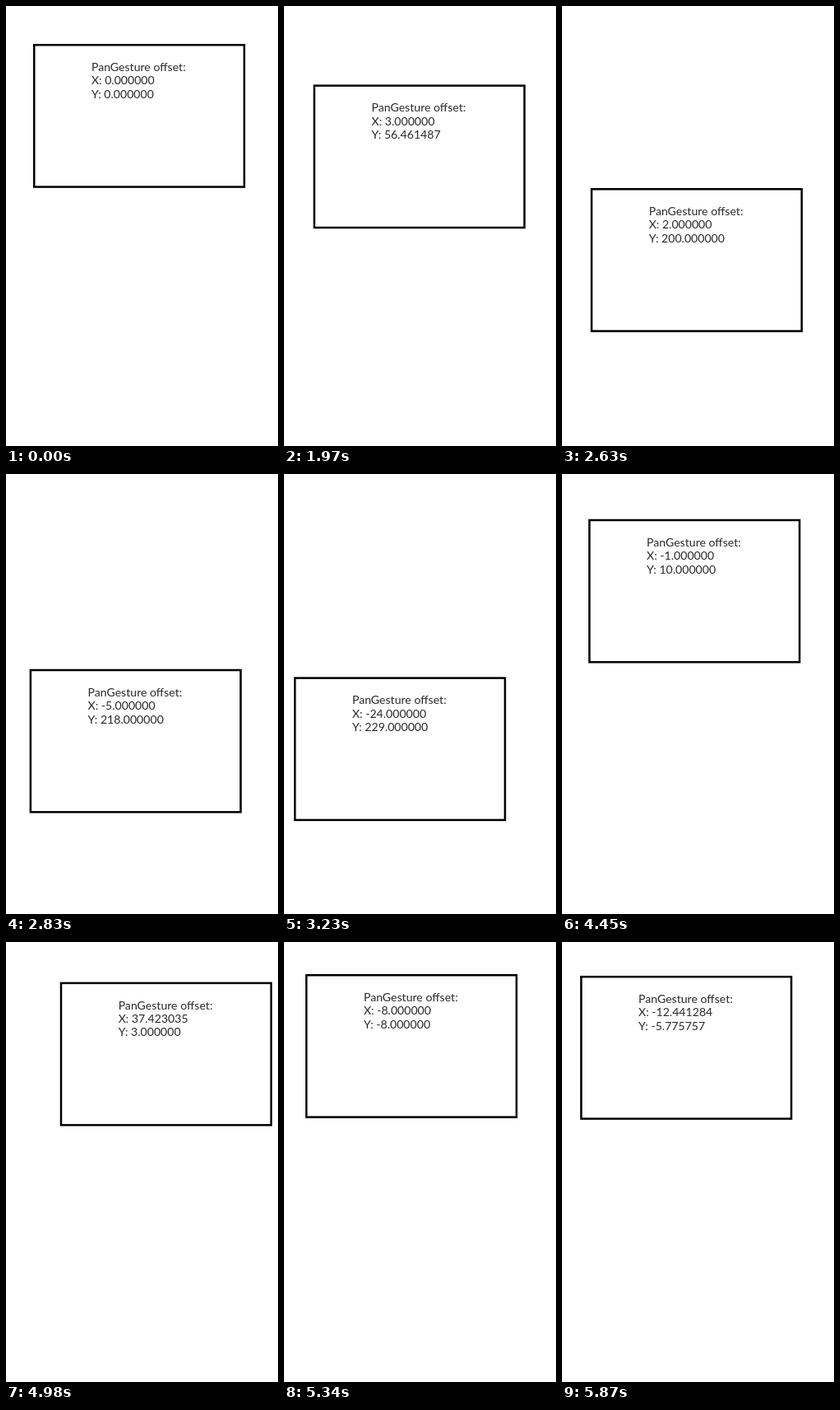
Write an HTML page that moves like this. It is 331 by 534 pixels and loops after 7660 ms.

```html
<!DOCTYPE html>
<html lang="en">
<head>
<meta charset="utf-8">
<title>Pan gesture offset</title>
<style>
  html, body { margin: 0; width: 100%; height: 100%; overflow: hidden; background: #fff; }
  svg { display: block; width: 331px; height: 534px; }
  rect { fill: #fff; stroke: #000; stroke-width: 2.5; }
  text { font: 14.1px Lato, "Open Sans", sans-serif; fill: #2a2a2a; }
</style>
</head>
<body>
<svg viewBox="0 0 331 534">
  <g id="card">
    <rect x="34.25" y="47.25" width="255.7" height="172.3"/>
    <text x="103.9" y="79">PanGesture offset:</text>
    <text x="103.9" y="95.4" id="x"></text>
    <text x="103.9" y="111.8" id="y"></text>
  </g>
</svg>
<script>
const LOOP = 7660;
const SCALE = 0.875; // stage pixels per offset unit
const STEP = 90;     // approximate ms between touch samples

// Each drag: start and duration in ms, then the offset it ends on
const drags = [
  [1970, 0, 3, 56.461487],
  [2370, 130, 8, 158],
  [2630, 0, 2, 200],
  [2760, 70, -5, 218],
  [3030, 200, -24, 229],
  [3380, 270, -30, 148],
  [3850, 0, -15.194397, 79.388794],
  [3980, 0, -20, 43],
  [4180, 130, -12, 12],
  [4450, 400, 42, 3],
  [4980, 0, 37.423035, 3],
  [5200, 140, -8, -8],
  [5480, 60, -17, -10],
  [5870, 0, -12.441284, -5.775757]
];

const [card, xText, yText] = ["card", "x", "y"].map(id => document.getElementById(id));

const between = (a, b, p) => Math.round(a + (b - a) * p);

function offsetAt(t) {
  let x = 0, y = 0;
  for (const [start, duration, toX, toY] of drags) {
    if (t < start) break;
    const gaps = Math.round(duration / STEP);
    const sample = gaps ? Math.floor((t - start) / duration * gaps) : 0;
    if (sample < gaps) {
      const p = (sample + 1) / (gaps + 1);
      return [between(x, toX, p), between(y, toY, p)];
    }
    [x, y] = [toX, toY];
  }
  return [x, y];
}

function draw(now) {
  const [x, y] = offsetAt(now % LOOP);
  card.setAttribute("transform", `translate(${x * SCALE} ${y * SCALE})`);
  xText.textContent = `X: ${x.toFixed(6)}`;
  yText.textContent = `Y: ${y.toFixed(6)}`;
}

function tick() {
  draw(performance.now());
  requestAnimationFrame(tick);
}

draw(0);
requestAnimationFrame(tick);
</script>
</body>
</html>
```
